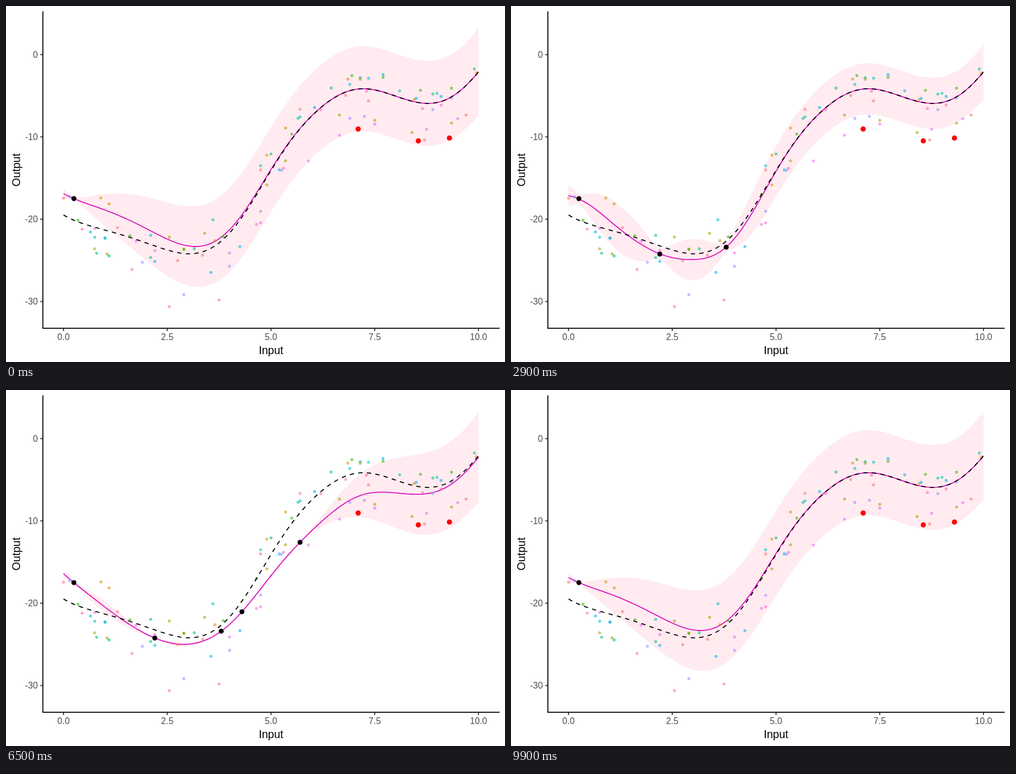
Write an HTML page with a canvas that moves like this. It is 885x632 px and loops after 10 s.

```html
<!DOCTYPE html>
<html lang="en">
<head>
<meta charset="utf-8">
<title>Regression updates</title>
<style>
  html, body { margin: 0; width: 100%; height: 100%; overflow: hidden; background: #fff; }
  canvas, svg { position: absolute; left: 0; top: 0; width: 885px; height: 632px; }
  text { font-family: "Liberation Sans", Arial, sans-serif; font-size: 15.7px; fill: #4d4d4d; }
  .title { font-size: 19.6px; fill: #000; text-anchor: middle; }
</style>
</head>
<body>
<canvas id="plot"></canvas>
<svg id="labels" viewBox="0 0 885 632">
  <text class="title" x="470" y="618">Input</text>
  <text class="title" transform="translate(25 291) rotate(-90)">Output</text>
</svg>
<script>
const LOOP = 10000, STEP = 100, STEPS = 7;
const STARTS = [800, 2300, 3800, 5100, 6500, 7900, 9300];
const XS = Array.from({ length: 201 }, (_, i) => i / 20);

const px = x => 102 + 73.6 * x;
const py = y => 86.3 - 14.61 * y;
const X_TICKS = [0, 2.5, 5, 7.5, 10];
const Y_TICKS = [0, -10, -20, -30];

const canvas = document.getElementById("plot");
const ctx = canvas.getContext("2d");
const ratio = window.devicePixelRatio || 1;
canvas.width = 885 * ratio;
canvas.height = 632 * ratio;

const svg = document.getElementById("labels");
function label(str, x, y, anchor) {
  const el = document.createElementNS("http://www.w3.org/2000/svg", "text");
  el.setAttribute("x", x);
  el.setAttribute("y", y);
  el.setAttribute("text-anchor", anchor);
  el.textContent = str;
  svg.appendChild(el);
}
X_TICKS.forEach(x => label(x.toFixed(1), px(x), 593.3, "middle"));
Y_TICKS.forEach(y => label(String(y), 56.5, py(y) + 5.7, "end"));

const dot = (a, b) => a.reduce((sum, v, i) => sum + v * b[i], 0);

function solve(A, b) {
  const rows = A.map((row, i) => [...row, b[i]]);
  const n = b.length;
  for (let i = 0; i < n; i++) {
    for (let j = 0; j < n; j++) {
      if (j === i) continue;
      const f = rows[j][i] / rows[i][i];
      for (let c = i; c <= n; c++) rows[j][c] -= f * rows[i][c];
    }
  }
  return rows.map((row, i) => row[n] / row[i]);
}

// Gaussian process through the given points.
function fit(points, sd, len, noise) {
  const kernel = (a, b) => sd * sd * Math.exp(-((a - b) ** 2) / (2 * len * len));
  const cov = x => points.map(p => kernel(x, p[0]));
  const K = points.map((p, i) => cov(p[0]).map((v, j) => v + (i === j ? noise * noise : 0)));
  const weights = solve(K, points.map(p => p[1]));
  return {
    mean: x => dot(cov(x), weights),
    variance: x => {
      const k = cov(x);
      return Math.max(0, sd * sd + noise * noise - dot(k, solve(K, k)));
    }
  };
}

const prior = fit([
  [0, -19.49], [0.6, -20.75], [1.5, -22.05], [2.3, -23.42], [3, -24.2], [3.6, -23.39], [4.2, -20.45],
  [5, -14.08], [6, -7.37], [7.1, -4.18], [8, -5.04], [8.75, -5.92], [9.4, -4.98], [10, -2.1]
], 10, 1.2, 0.05).mean;
const priorLine = XS.map(prior);

const known = [[0.25, -17.5], [2.2, -24.23], [3.8, -23.4], [4.3, -21.03], [5.7, -12.6], [5.75, -12.22], [5.8, -12.5]];
const held = [[7.1, -9.04], [8.55, -10.48], [9.3, -10.14]];

// One more known point per state; each has its own scale, length and noise.
const states = [
  [5.17, 1.93, 0.035], [3.8, 0.6, 0.62], [3.08, 0.62, 0.48], [3.08, 1, 0.4],
  [5.54, 1.75, 0.035], [4.18, 1.25, 0.08], [5, 1.55, 0.41]
].map((params, i) => {
  const residuals = known.slice(0, i + 1).map(([x, y]) => [x, y - prior(x)]);
  const model = fit(residuals, ...params);
  const edge = x => 2 * Math.exp((x - 10) / 0.2);
  return {
    mean: XS.map(x => prior(x) + model.mean(x)),
    half: XS.map(x => Math.sqrt(model.variance(x) + edge(x)))
  };
});

let seed = 7;
function random() {
  seed = (seed * 16807) % 2147483647;
  return seed / 2147483647;
}

// Ten tasks, each a smooth departure from the prior given at x = 1, 3, 5, 7, 9.
const tasks = [
  ["#F8766D", 1.4, -1, 2.4, -0.7, -4.1],
  ["#D89000", 3.4, 0.3, 2.4, 1.5, 0.3],
  ["#A3A500", -2.7, 2.4, -0.7, -3.1, -3.4],
  ["#39B600", 0.3, 0.5, 0.1, 1.9, 1.4],
  ["#00BF7D", -3.4, 0.7, 2.3, 1, 0.7],
  ["#00BFC4", -0.7, 3.3, 2.4, 1, 0.7],
  ["#00B0F6", -1.4, -2.9, -2, 2, 0.3],
  ["#9590FF", 1.4, -5.5, -2.4, -3.3, -0.7],
  ["#E76BF3", 0, -1.2, -4.4, -4.4, -3.4],
  ["#FF62BC", -1.6, -7.5, -3, 0, -0.7]
].map(([color, ...keys]) => {
  const shift = fit(keys.map((v, i) => [2 * i + 1, v]), 3, 1.4, 0.1).mean;
  const points = Array.from({ length: 10 }, (_, i) => {
    const x = Math.round((i + random()) * 20) / 20;
    return [x, prior(x) + shift(x) + random() - 0.5];
  });
  return { color, points };
});

function disc([x, y], r) {
  ctx.beginPath();
  ctx.arc(px(x), py(y), r, 0, 2 * Math.PI);
  ctx.fill();
}

function stroke(line, color, dash) {
  ctx.beginPath();
  line.forEach((y, i) => ctx.lineTo(px(XS[i]), py(y)));
  ctx.strokeStyle = color;
  ctx.lineWidth = 1.8;
  ctx.setLineDash(dash);
  ctx.stroke();
  ctx.setLineDash([]);
}

function drawBand(mean, half) {
  const edge = (i, sign) => ctx.lineTo(px(XS[i]), py(mean[i] + sign * half[i]));
  ctx.fillStyle = "#ffebf0";
  ctx.beginPath();
  for (let i = 0; i < XS.length; i++) edge(i, 1);
  for (let i = XS.length - 1; i >= 0; i--) edge(i, -1);
  ctx.fill();
}

function drawTasks() {
  ctx.globalAlpha = 0.5;
  ctx.lineWidth = 1.1;
  for (const { color, points } of tasks) {
    ctx.fillStyle = ctx.strokeStyle = color;
    for (const p of points) {
      disc(p, 2.1);
      ctx.stroke();
    }
  }
  ctx.globalAlpha = 1;
}

function drawAxes() {
  ctx.lineWidth = 1.8;
  ctx.strokeStyle = "#000";
  ctx.beginPath();
  ctx.moveTo(65.4, 9.5);
  ctx.lineTo(65.4, 572.2);
  ctx.lineTo(875.5, 572.2);
  ctx.stroke();
  ctx.strokeStyle = "#333";
  ctx.beginPath();
  for (const x of X_TICKS) {
    ctx.moveTo(px(x), 572.5);
    ctx.lineTo(px(x), 577);
  }
  for (const y of Y_TICKS) {
    ctx.moveTo(65, py(y));
    ctx.lineTo(60.7, py(y));
  }
  ctx.stroke();
}

// Stepped linear blend; points enter and leave only when a change is complete.
function pose(t) {
  let from = 0, p = 0;
  STARTS.forEach((start, i) => {
    if (t >= start) {
      from = i;
      p = Math.min(1, (Math.floor((t - start) / STEP) + 1) / STEPS);
    }
  });
  const to = (from + 1) % states.length;
  const a = states[from], b = states[to];
  const mix = key => a[key].map((v, i) => v + (b[key][i] - v) * p);
  return { mean: mix("mean"), half: mix("half"), count: (p < 1 ? from : to) + 1 };
}

function draw(t) {
  const { mean, half, count } = pose(t);
  ctx.setTransform(ratio, 0, 0, ratio, 0, 0);
  ctx.fillStyle = "#fff";
  ctx.fillRect(0, 0, 885, 632);
  drawBand(mean, half);
  stroke(mean, "#db15c1", []);
  drawTasks();
  stroke(priorLine, "#000", [7.6, 7.6]);
  ctx.fillStyle = "#f00";
  held.forEach(p => disc(p, 4.6));
  ctx.fillStyle = "#000";
  known.slice(0, count).forEach(p => disc(p, 4.4));
  drawAxes();
}

const begin = performance.now();
function tick() {
  draw((performance.now() - begin) % LOOP);
  requestAnimationFrame(tick);
}
tick();
</script>
</body>
</html>
```
